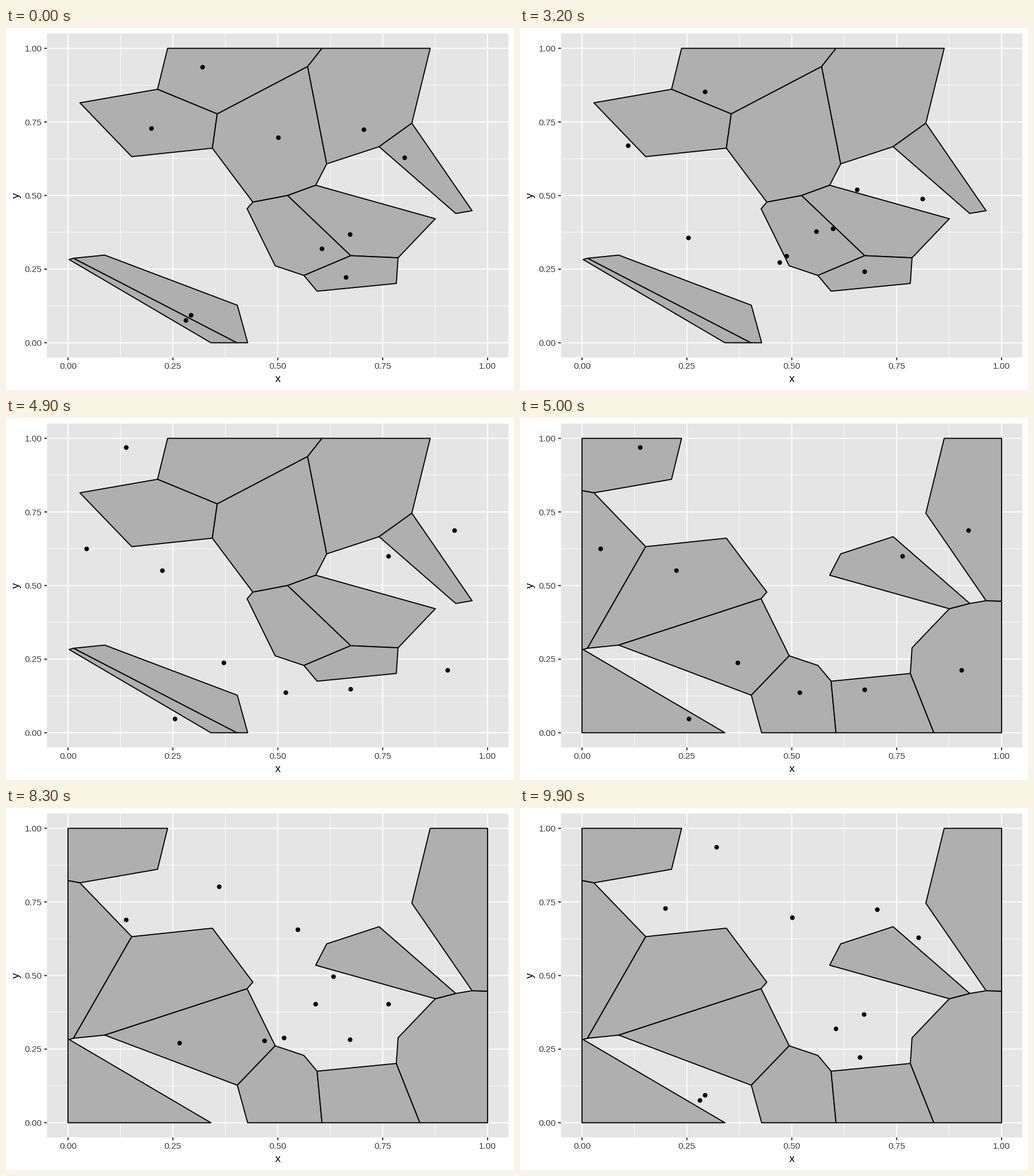
Recreate the animation shown at these times as a matplotlib script. Size 885 by 632 pixels, loop 10 s.

```python
import numpy as np
import matplotlib.pyplot as plt
from matplotlib.animation import FuncAnimation
from matplotlib.collections import LineCollection, PolyCollection
from matplotlib.patches import Rectangle

W, H, DPI = 885, 632, 100
FRAMES, INTERVAL = 100, 100
PT = 72 / DPI                      # points per pixel
LEFT, RIGHT, TOP, BOTTOM = 71.4, 875.4, 9.8, 575.2
X0, X1, Y0, Y1 = 108, 839, 549.5, 35.5
LINE = 1.87 * PT

# Corners of the tessellation, in pixels
CORNERS = {
    "a": (281.5, Y1), "b": (550.5, Y1), "c": (739, Y1),
    "d": (264, 107), "e": (368, 150), "f": (525.5, 67.3),
    "g": (128.7, 130.6), "h": (219, 224.6), "i": (359.5, 209.8),
    "j": (430, 304), "k": (420, 315.5), "l": (490.5, 292.5),
    "m": (558.7, 237.2), "n": (539.5, 274.5), "o": (650, 207.2),
    "p": (707, 166.2), "q": (812, 319), "r": (783.5, 323.8),
    "s": (748, 333), "t": (683, 401.2), "u": (600.5, 397.5),
    "v": (680, 446), "w": (542, 459.5), "x": (519, 432),
    "y": (469, 415.2), "z": (110, 404.2), "A": (117.5, 402),
    "B": (172, 396.5), "C": (403, 484), "D": (421, Y0),
    "E": (402, Y0), "F": (357, Y0), "G": (X0, Y1),
    "H": (X0, 126.8), "I": (X0, 404), "J": (X0, Y0),
    "K": (X1, Y1), "L": (X1, 319.8), "M": (X1, Y0),
    "N": (721, Y0), "O": (550.5, Y0),
}
INNER = "abfed gdeih efmnlji bcpomf opqr lnstu jluxyk utvwx ABCDE zAEF"
OUTER = "GadgH HghAzI hijkBA IzFJ BkyC CyxwOD wvNO vtsrqLMN morsn cKLqp"

# Point positions in the two states, paired by row
START = np.array([
    (342, 67.5), (252.8, 174.7), (474, 191), (622.5, 176.8), (694, 225.6),
    (599, 360), (550, 385.2), (592.3, 435), (321.6, 501.2), (312.5, 510.2)])
END = np.array([
    (768.8, 440.2), (140.3, 228), (209.3, 51.2), (487.2, 478.6), (294.2, 525.4),
    (600, 473.5), (379, 427), (781, 196), (272.3, 265.6), (666.2, 241)])


def sx(v):
    return X0 + (X1 - X0) * v


def sy(v):
    return Y0 + (Y1 - Y0) * v


def ease(t):
    t = min(max(t, 0), 1)
    return 4 * t**3 if t < 0.5 else 1 - 4 * (1 - t)**3


def add_lines(segments, color, width, z):
    ax.add_collection(LineCollection(
        segments, colors=color, linewidths=width, capstyle="butt",
        snap=False, zorder=z), autolim=False)


def add_grid(breaks, width, z):
    add_lines([[(sx(v), TOP), (sx(v), BOTTOM)] for v in breaks]
              + [[(LEFT, sy(v)), (RIGHT, sy(v))] for v in breaks],
              "white", width, z)


def add_cells(names):
    cells = PolyCollection(
        [[CORNERS[c] for c in name] for name in names.split()],
        facecolors="#afafaf", edgecolors="black", linewidths=LINE,
        joinstyle="round", snap=False, zorder=4)
    ax.add_collection(cells, autolim=False)
    return cells


def label(x, y, text, size, color, ha="center", **kw):
    ax.text(x, y, text, fontsize=size * PT, color=color, ha=ha,
            va="baseline", family=["Liberation Sans"], **kw)


fig = plt.figure(figsize=(W / DPI, H / DPI), dpi=DPI, facecolor="white")
ax = fig.add_axes([0, 0, 1, 1])
ax.set_xlim(0, W)
ax.set_ylim(H, 0)
ax.axis("off")

ax.add_patch(Rectangle((LEFT, TOP), RIGHT - LEFT, BOTTOM - TOP,
                       facecolor="#e5e5e5", linewidth=0, snap=False, zorder=1))
major = np.linspace(0, 1, 5)
add_grid(major[:-1] + 0.125, LINE / 2, 2)
add_grid(major, LINE, 3)
add_lines([[(sx(v), BOTTOM), (sx(v), BOTTOM + 4.8)] for v in major]
          + [[(LEFT - 4.8, sy(v)), (LEFT, sy(v))] for v in major],
          "#252525", LINE, 3)

for v in major:
    label(sx(v), 595.2, f"{v:.2f}", 15.4, "#3d3d3d")
    label(62.8, sy(v) + 5.5, f"{v:.2f}", 15.4, "#3d3d3d", ha="right")
label((LEFT + RIGHT) / 2, 617.6, "x", 19.2, "black")
label(23.4, (TOP + BOTTOM) / 2, "y", 19.2, "black",
      rotation=90, rotation_mode="anchor")

inner, outer = add_cells(INNER), add_cells(OUTER)
dots, = ax.plot([], [], "o", color="black", markersize=8.1 * PT,
                markeredgewidth=0, snap=False, zorder=5)


def draw(frame):
    first = frame < 50
    inner.set_visible(first)
    outer.set_visible(not first)
    # hold, travel out, hold, travel back
    share = ease((frame - 12) / 38) if first else 1 - ease((frame - 63) / 37)
    dots.set_data(*(START + (END - START) * share).T)
    return inner, outer, dots


anim = FuncAnimation(fig, draw, frames=FRAMES, interval=INTERVAL,
                     init_func=lambda: draw(0), repeat=True, repeat_delay=0)
plt.show()
```
